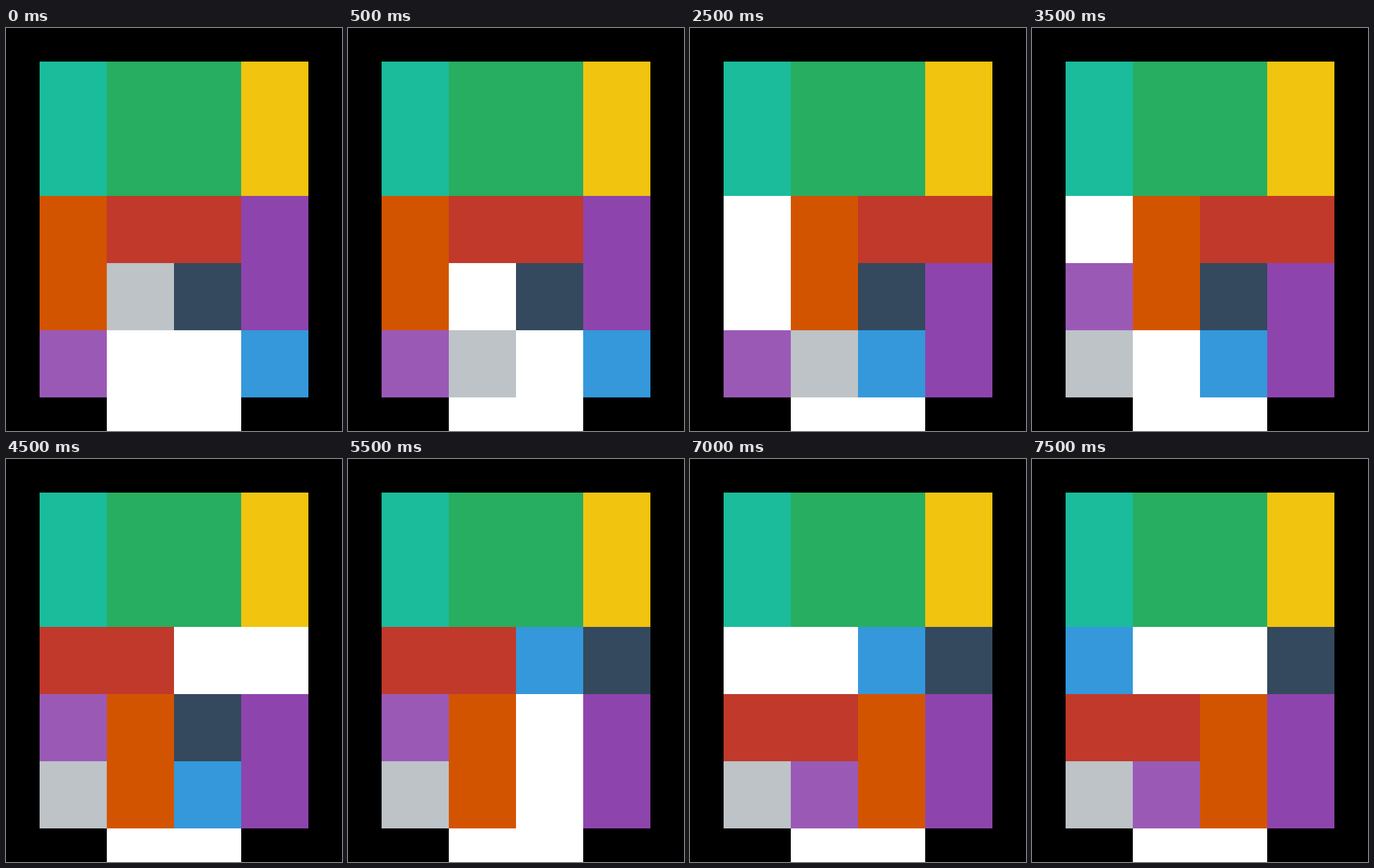
Recreate the animation shown at these times as an HTML page. Size 500 by 600 pixels, loop 8 s.

```html
<!DOCTYPE html>
<html lang="en">
<head>
<meta charset="utf-8">
<title>Sliding block puzzle</title>
<style>
  html, body { margin: 0; width: 100%; height: 100%; overflow: hidden; background: #000; }
  svg { display: block; }
</style>
</head>
<body>
<svg id="stage" width="500" height="600" viewBox="0 0 500 600" shape-rendering="crispEdges">
  <rect width="500" height="600" fill="#000"/>
  <path d="M50 50H450V550H350V600H150V550H50Z" fill="#fff"/>
</svg>
<script>
const CELL = 100, MARGIN = 50, STEP = 500, LOOP = 8000;

// column, row, width, height in cells
const blocks = {
  teal:   { box: [0, 0, 1, 2], fill: '#1abc9c' },
  green:  { box: [1, 0, 2, 2], fill: '#27ae60' },
  yellow: { box: [3, 0, 1, 2], fill: '#f1c40f' },
  orange: { box: [0, 2, 1, 2], fill: '#d35400' },
  red:    { box: [1, 2, 2, 1], fill: '#c0392b' },
  violet: { box: [3, 2, 1, 2], fill: '#8e44ad' },
  silver: { box: [1, 3, 1, 1], fill: '#bdc3c7' },
  navy:   { box: [2, 3, 1, 1], fill: '#34495e' },
  purple: { box: [0, 4, 1, 1], fill: '#9b59b6' },
  blue:   { box: [3, 4, 1, 1], fill: '#3498db' }
};

// one move per step: block, columns right, rows down
const moves = [
  ['silver', 0, 1], ['blue', -1, 0], ['violet', 0, 1], ['red', 1, 0],
  ['orange', 1, 0], ['purple', 0, -1], ['silver', -1, 0], ['orange', 0, 1],
  ['red', -2, 0], ['navy', 1, -1], ['blue', 0, -2], ['orange', 1, 0],
  ['purple', 1, 1], ['red', 0, 1], ['blue', -2, 0]
];

const stage = document.getElementById('stage');
for (const block of Object.values(blocks)) {
  const rect = document.createElementNS('http://www.w3.org/2000/svg', 'rect');
  rect.setAttribute('width', block.box[2] * CELL);
  rect.setAttribute('height', block.box[3] * CELL);
  rect.setAttribute('fill', block.fill);
  stage.append(rect);
  block.rect = rect;
}

function render(time) {
  const done = moves.slice(0, Math.floor((time % LOOP) / STEP));
  for (const [name, { box, rect }] of Object.entries(blocks)) {
    let [col, row] = box;
    for (const [mover, dx, dy] of done) {
      if (mover === name) { col += dx; row += dy; }
    }
    rect.setAttribute('x', MARGIN + col * CELL);
    rect.setAttribute('y', MARGIN + row * CELL);
  }
}

const start = performance.now();
function tick() {
  render(performance.now() - start);
  requestAnimationFrame(tick);
}
tick();
</script>
</body>
</html>
```
